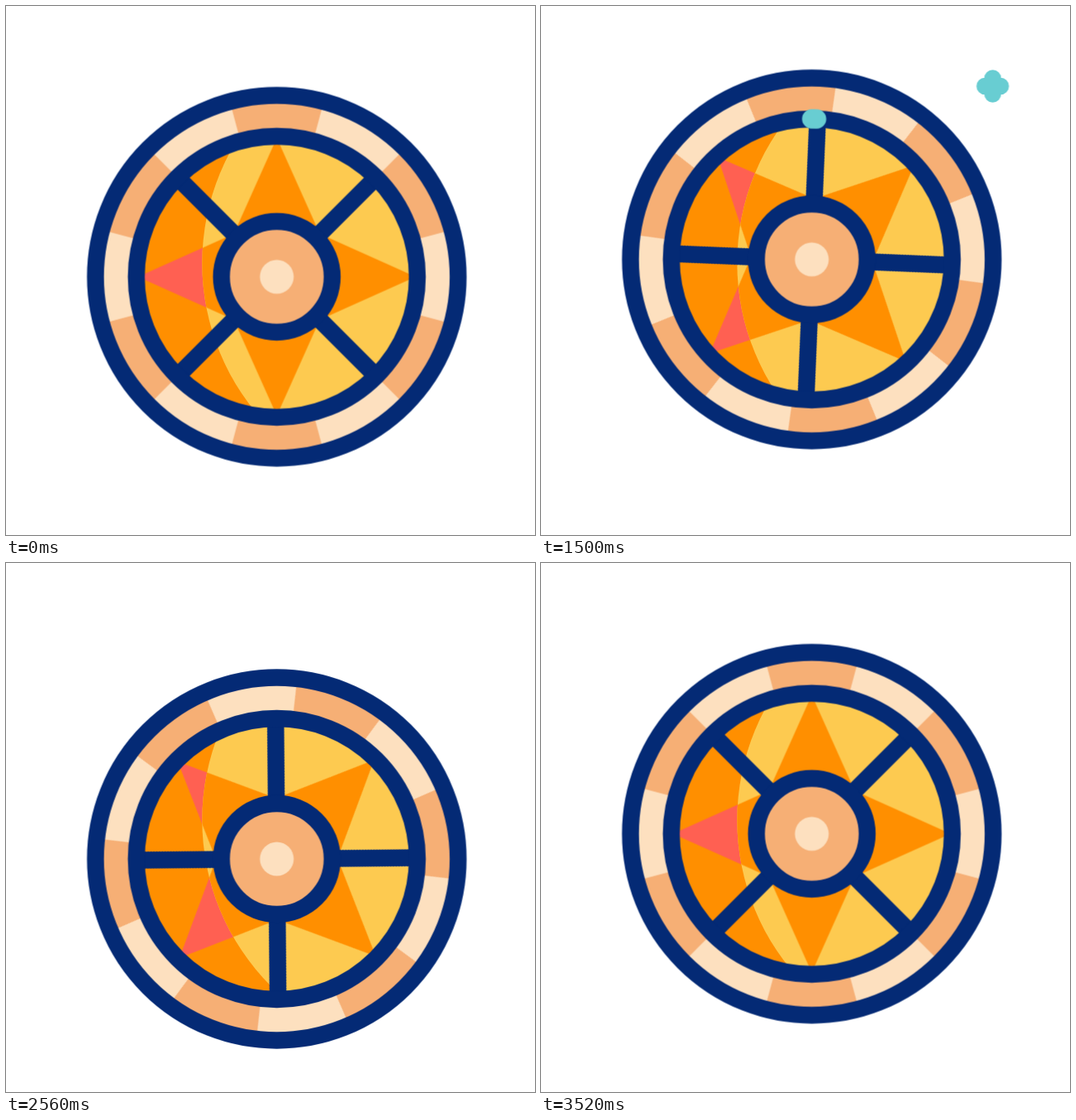
These frames come from a looping animation (640x640 px, 3.6 s). An HTML page without scripts:

```html
<!DOCTYPE html>
<html lang="en">
<head>
<meta charset="utf-8">
<title>Spinning wheel</title>
<style>
  html, body { margin: 0; width: 100%; height: 100%; overflow: hidden; background: #fff; }
  svg { display: block; width: 100%; height: 100%; }

  :root {
    --navy: #042a75;
    --teal: #68cdd2;
    --yellow: #fdca50;
    --orange: #ff8f00;
    --coral: #ff6052;
    --tan: #f6af75;
    --cream: #fde0bf;
    --soft: cubic-bezier(.333, 0, .667, 1);
  }

  .line { fill: none; stroke: var(--navy); stroke-width: 20.5; }
  .bob { animation: bob 3.6s infinite; }
  .rim { animation: rim 3.6s infinite; }
  .core { animation: core 3.6s infinite; }

  @keyframes bob {
    0% { transform: translate(327.6px, 327.6px); }
    2.778% { transform: translate(327.6px, 327.6px); animation-timing-function: cubic-bezier(.43, 0, .667, 1); }
    36.111% { transform: translate(327.6px, 302px); animation-timing-function: cubic-bezier(.45, 0, .72, 1); }
    62.5% { transform: translate(327.6px, 363.4px); animation-timing-function: cubic-bezier(.387, 0, .538, 1); }
    97.222%, 100% { transform: translate(327.6px, 327.6px); }
  }
  @keyframes rim {
    0% { transform: rotate(0deg); }
    2.778% { transform: rotate(0deg); animation-timing-function: cubic-bezier(.454, 0, .666, 1); }
    97.222%, 100% { transform: rotate(180deg); }
  }
  @keyframes core {
    0% { transform: rotate(0deg); }
    2.778% { transform: rotate(0deg); animation-timing-function: cubic-bezier(.333, 0, .667, .347); }
    13.333% { transform: rotate(-3.2deg); animation-timing-function: cubic-bezier(.333, .191, .667, .526); }
    30% { transform: rotate(-20.5deg); animation-timing-function: cubic-bezier(.333, .214, .667, .545); }
    52.778% { transform: rotate(-72.8deg); animation-timing-function: cubic-bezier(.333, .306, .667, .677); }
    71.111% { transform: rotate(-135.4deg); animation-timing-function: cubic-bezier(.333, .393, .667, .735); }
    80% { transform: rotate(-160.4deg); animation-timing-function: cubic-bezier(.333, .654, .667, 1); }
    97.222%, 100% { transform: rotate(-180deg); }
  }

  /* Teal arc that runs once around the inner ring */
  .sweep {
    fill: none; stroke: var(--teal); stroke-width: 23.5; stroke-linecap: round; opacity: 0;
    animation: sweep-show 3.6s step-end infinite, sweep-move 3.6s infinite, sweep-length 3.6s linear infinite;
  }
  @keyframes sweep-show {
    0% { opacity: 0; }
    40.556% { opacity: 1; }
    69.917%, 100% { opacity: 0; }
  }
  @keyframes sweep-move {
    0% { stroke-dashoffset: 0; }
    44.917% { stroke-dashoffset: 0; animation-timing-function: var(--soft); }
    69.917%, 100% { stroke-dashoffset: -100; }
  }
  @keyframes sweep-length {
    0% { stroke-dasharray: 0 200; }
    40.556% { stroke-dasharray: 0 200; animation-timing-function: cubic-bezier(.333, 0, .667, .333); }
    44.917% { stroke-dasharray: 8 200; }
    52.778% { stroke-dasharray: 24.8 200; }
    55.222% { stroke-dasharray: 25.9 200; }
    65.528% { stroke-dasharray: 8.3 200; animation-timing-function: cubic-bezier(.333, .667, .667, 1); }
    69.917%, 100% { stroke-dasharray: 0 200; }
  }

  /* Four dots flying outwards */
  .spark {
    fill: none; stroke: var(--teal); stroke-width: 20.5; stroke-linecap: round; opacity: 0;
    animation: spark-fade 3.6s linear infinite, spark-move 3.6s var(--soft) infinite, spark-length 3.6s var(--soft) infinite;
    animation-delay: var(--at);
  }
  @keyframes spark-fade {
    0%, 15.556% { opacity: 1; }
    17.778%, 100% { opacity: 0; }
  }
  @keyframes spark-move {
    0% { stroke-dashoffset: 0; }
    16.667%, 100% { stroke-dashoffset: -29.6; }
  }
  @keyframes spark-length {
    0% { stroke-dasharray: 0 99; }
    11.111% { stroke-dasharray: 3.4 99; }
    16.667%, 100% { stroke-dasharray: 1.4 99; }
  }
</style>
</head>
<body>
<svg viewBox="0 0 640 640">
  <defs>
    <path id="star" d="M0-168 52-52 168 0 52 52 0 168-52 52-168 0-52-52Z"/>
    <path id="rays" d="M0 0V-40M0 0H40M0 0V40M0 0H-40"/>
    <clipPath id="lit"><circle cx="521.3" cy="311" r="284"/></clipPath>
  </defs>

  <!-- Shaded disc, then its lit part behind a fixed edge -->
  <g class="bob">
    <circle r="168" fill="var(--orange)"/>
    <g class="core"><use href="#star" fill="var(--coral)"/></g>
  </g>
  <g clip-path="url(#lit)">
    <g class="bob">
      <circle r="168" fill="var(--yellow)"/>
      <g class="core"><use href="#star" fill="var(--orange)"/></g>
    </g>
  </g>

  <g class="bob">
    <g class="rim" fill="none" stroke-width="36">
      <circle r="194.5" stroke="var(--cream)"/>
      <circle r="194.5" stroke="var(--tan)" pathLength="12" stroke-dasharray="1" transform="rotate(15)"/>
    </g>
    <circle class="line" r="219.4"/>
    <g class="core"><path class="line" d="M-120-120 120 120M120-120-120 120"/></g>
    <circle class="line" r="170"/>
    <circle class="line" r="67" style="fill: var(--tan)"/>
    <circle r="20.5" fill="var(--cream)"/>
    <circle class="sweep" r="170" pathLength="100" transform="rotate(-90)"/>
  </g>

  <use class="spark" href="#rays" x="114.8" y="97" style="--at: .1s"/>
  <use class="spark" href="#rays" x="527" y="570.8" style="--at: .7s"/>
  <use class="spark" href="#rays" x="546.5" y="97" style="--at: 1.3s"/>
  <use class="spark" href="#rays" x="95.5" y="570.8" style="--at: 1.9s"/>
</svg>
</body>
</html>
```
